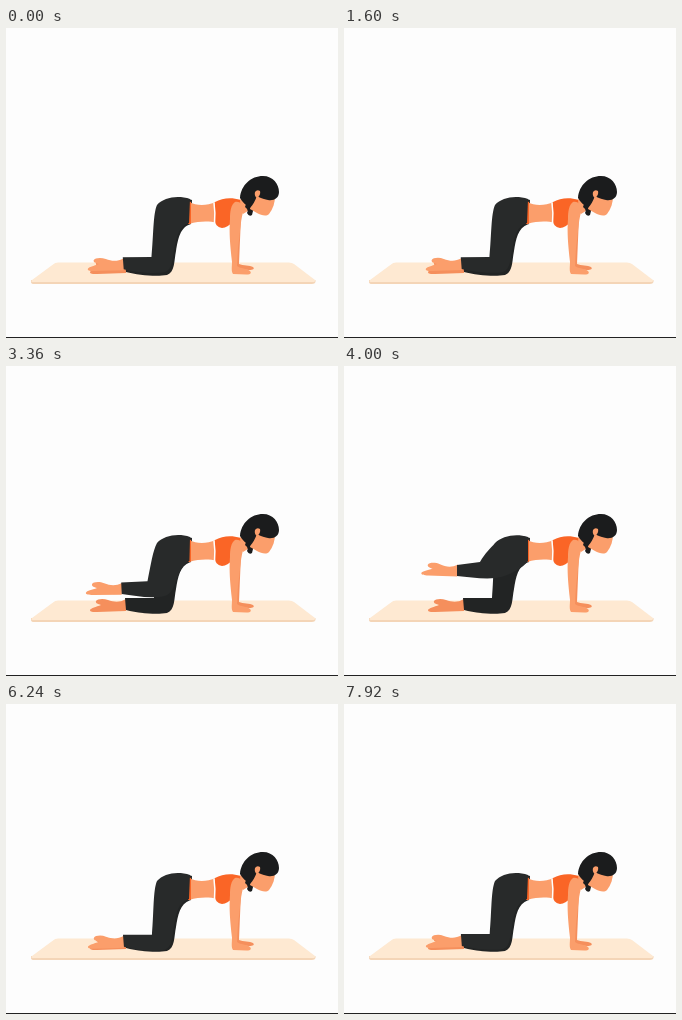
An HTML page for the animation above (8 s loop, 332 by 310 pixels).

```html
<!DOCTYPE html>
<html lang="en">
<head>
<meta charset="utf-8">
<title>Kneeling leg lift</title>
<style>
  html, body { margin: 0; width: 100%; height: 100%; overflow: hidden; background: #fdfdfd; }
  svg { display: block; width: 332px; height: 310px; }
  .skin { fill: #fb9e6b; }
  .shade { fill: #f58f5c; }
  .top { fill: #fa6526; }
  .hair { fill: #1b1c1d; }
  .pants { fill: #282a2a; }
  .far { fill: #222424; }
</style>
</head>
<body>
<svg viewBox="0 0 332 310">
  <defs>
    <path id="foot" d="M1 0C-6 4-11 3-17 1C-22-1-28 0-29 2C-30 4-27 5-24 6C-29 8-34 9-35 11C-35 13-32 13-28 13L1 12Z"/>
  </defs>

  <path fill="#f4d5b7" d="M25 252H309.500V254Q309 256 306 256H28Q25 256 25 254Z"/>
  <path fill="#fee9d2" d="M52 234.500H283Q286 234.500 288 236L309 252Q310 254 306 254H28Q24 254 26 252L47 236.500Q49 234.500 52 234.500Z"/>
  <path fill="#222" d="M0 309H332V310H0Z"/>

  <use href="#foot" class="shade" x="119" y="233"/>
  <path id="farLeg" class="far"/>

  <path class="shade" d="M226 190L235 188L233 236C237 238 244 237 247 239C249 241 247 242 243 242L229 241Z"/>
  <path class="skin" d="M183 174C191 178 200 178 210 174L211 195C203 193 194 193 183 196Z"/>
  <path class="top" d="M182 173L185 174L185 195.500L182 196Z"/>
  <path class="skin" d="M226 172C234 172 239 171 243 167L251 178C246 181 241 183 237 186Z"/>
  <path class="top" d="M209 174C216 170 226 169 234 172L235 183C229 190 224 200 216 200C211 199 209 196 209 192Z"/>
  <path fill="none" stroke="#fff" stroke-width="1.500" d="M208 175Q209.500 185 208.500 195"/>
  <path class="skin" d="M229 174C235 173 238 178 237 184C234 196 234 207 232 220L231 238C235 241 240 240 244 243C246 245 244 247 240 246.500L227 246C225 243 226 239 226 234C224 216 223 204 224 191C224 183 225 177 229 174Z"/>

  <path class="hair" d="M240 176L248 179L246 187Q243 189 241 185Q243 182 239 179Z"/>
  <path class="skin" d="M246 168L269 168C269 175 267 181 263 186C260 189 255 187 251 185L244 181Z"/>
  <path class="hair" d="M234 170C235 157 245 148 257 148C267 148 273 156 273 164C273 170 268 173 262 172C256 171 253 169 251 168C249 173 247 177 244 180C240 177 236 174 234 170Z"/>
  <path class="skin" d="M249 164Q251 161 254 163Q255 167 251 170Q248 168 249 164Z"/>

  <use id="nearFoot" href="#foot" class="skin"/>
  <path id="nearLeg" class="pants"/>
</svg>
<script>
  const LOOP = 8000, STEP = 80, REP = 3150;
  const el = id => document.getElementById(id);

  // Outline points of the leg, kneeling and lifted
  const down = [184,171, 172,167, 158,169, 151,177, 147,186, 148,208, 146,231,
    117,231, 118,243, 130,246, 148,248, 159,246, 167,243, 166,232, 168,222, 170,210, 172,198, 183,195];
  const up = [184,171, 172,167, 158,170, 151,177, 147,182, 141,187, 136,196,
    113,199, 113,210, 128,211, 146,215, 160,210, 166,208, 170,206, 173,204, 177,202, 181,199, 184,195];

  const mix = (a, b, k) => a + (b - a) * k;
  const ease = (t, from, to) => {
    const k = Math.min(1, Math.max(0, (t - from) / (to - from)));
    return (1 - Math.cos(Math.PI * k)) / 2;
  };

  function outline(k) {
    const p = down.map((v, i) => mix(v, up[i], k));
    const seg = (a, b) => p.slice(a * 2, b * 2).join(' ');
    return `M${seg(0, 1)}C${seg(1, 7)}L${seg(7, 9)}C${seg(9, 18)}Z`;
  }

  function lift(t) {
    const p = (t + 100) % REP - 100;
    return ease(p, -100, 560) - ease(p, 1220, 1670);
  }

  function draw(now) {
    const t = Math.floor(now % LOOP / STEP) * STEP;
    const k = lift(t);
    el('nearLeg').setAttribute('d', outline(k));
    el('nearFoot').setAttribute('transform',
      `translate(${mix(117, 113, k)} ${mix(232, 198.5, k)}) rotate(${mix(0, 4, k)})`);
    requestAnimationFrame(draw);
  }

  el('farLeg').setAttribute('d', outline(0));
  el('farLeg').setAttribute('transform', 'translate(2 1)');
  draw(performance.now());
</script>
</body>
</html>
```
